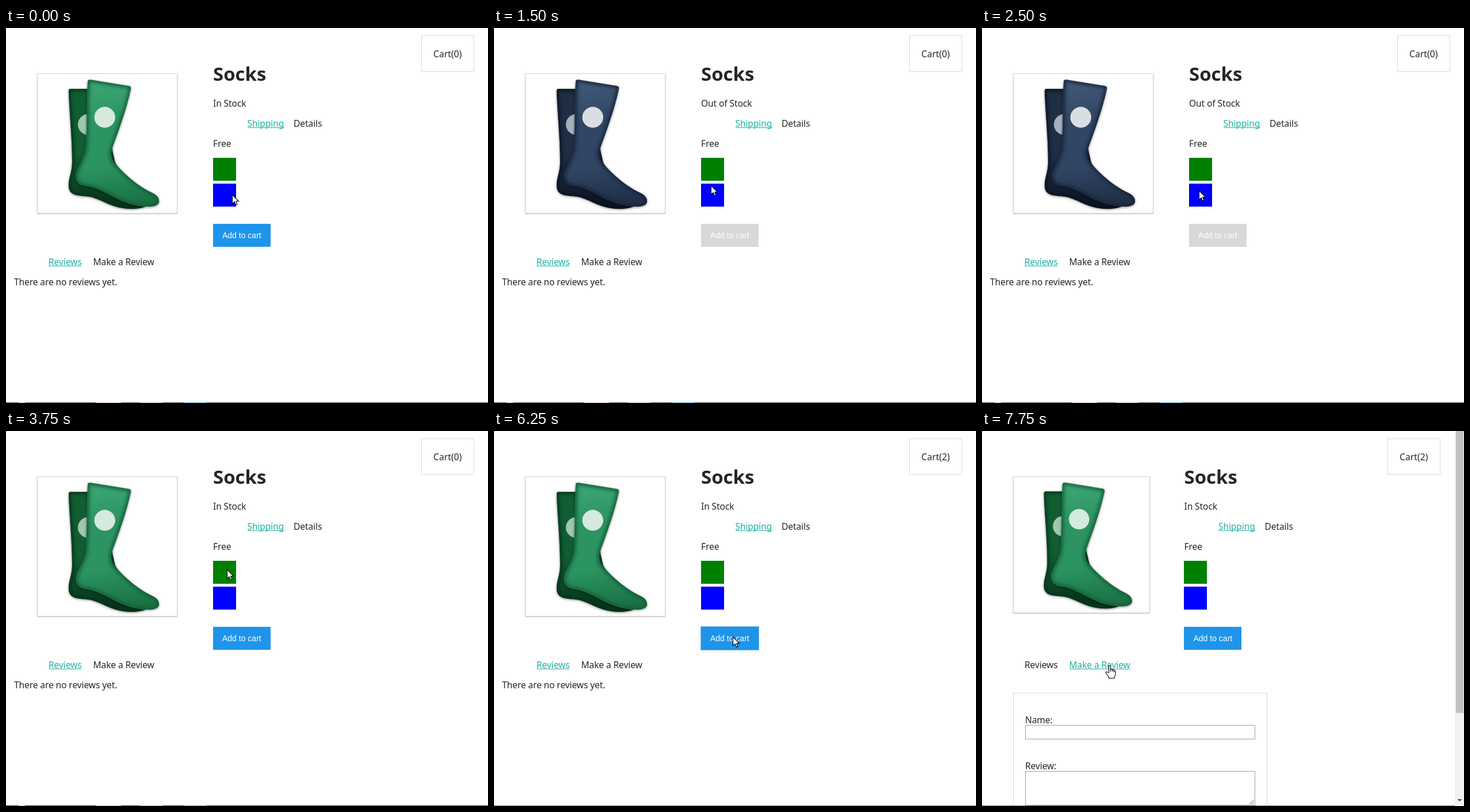
Animation, 838 px wide and 653 px high, one loop 8000 ms. Source, as an HTML page with a canvas:

```html
<!DOCTYPE html>
<html lang="en">
<head>
<meta charset="utf-8">
<title>Socks</title>
<style>
  html, body { margin: 0; width: 100%; height: 100%; overflow: hidden; background: #fff; }
  canvas { display: block; width: 838px; height: 653px; }
</style>
</head>
<body>
<canvas id="stage" width="838" height="653"></canvas>
<script>
const ctx = document.getElementById('stage').getContext('2d');
const LOOP = 8000;
const INK = '#262626', TEAL = '#1fb1a3', RULE = '#d8d8d8';
const BODY = '15.6px "Noto Sans", "Open Sans", sans-serif';
const TITLE = 'bold 33px "Noto Sans", "Open Sans", sans-serif';
const BUTTON = '14px "Liberation Sans", Arial, sans-serif';

// Pointer stops: time, x, y
const STOPS = [
  [0, 393, 290], [250, 350, 243], [500, 371, 246], [750, 382, 268],
  [1000, 380, 298], [1500, 377, 274], [1750, 381, 248], [2000, 376, 246],
  [2500, 377, 283], [2750, 379, 279], [3500, 376, 273], [3750, 384, 241],
  [4000, 402, 246], [4250, 434, 341], [4500, 406, 387], [4750, 415, 358],
  [6750, 210, 488], [7000, 146, 432], [7250, 114, 418], [7500, 222, 408]
];

const PALETTES = {
  green: { light: '#3ca674', mid: '#2b9461', dark: '#1a7244', rim: '#135c37', back: '#115e32', deep: '#06331a', badge: '#d5e9dd', badgeBack: '#a3c6b1' },
  navy: { light: '#425979', mid: '#314664', dark: '#1f2f47', rim: '#18253a', back: '#1f2e45', deep: '#0b1422', badge: '#d9dee3', badgeBack: '#a6b0bd' }
};

const SOCK = new Path2D('M146 90 L214 101 Q218 102 217 106 C210 140 196 178 185 208 ' +
  'C181 221 183 229 191 238 C208 256 230 276 254 287 Q267 293 266 303 ' +
  'Q264 311 247 311 C222 311 203 303 184 293 C168 284 151 276 136 275 ' +
  'Q121 272 121 257 C122 244 134 232 138 212 C141 190 140 130 142 94 Q142 90 146 90 Z');
const BACK_SOCK = new Path2D('M112 106 L160 106 L190 235 L242 311 Q226 317 205 314 ' +
  'C181 311 165 298 147 294 C130 291 108 295 109 273 C109 261 115 250 115 233 ' +
  'C115 190 110 146 109 110 Q109 106 112 106 Z');
const ARROW = new Path2D('M.5 .5 V16 L4.1 12.7 L6.6 18.3 L9 17.3 L6.6 11.8 H11.6 Z');
const HAND = new Path2D('M-1.5 13 V1.8 Q-1.5 0 0 0 Q1.6 0 1.6 1.8 V7 Q4.5 6 4.8 8 ' +
  'Q7.2 7 7.6 9 Q10 8.6 10 11 V15.5 Q10 18 8 20 V22.5 H-1.5 V20.5 ' +
  'L-6.2 14 Q-7.5 12 -6 11.3 Q-4.7 10.8 -3 13 Z');

function text(s, x, y, { font = BODY, color = INK, spacing = -0.12, underline = false } = {}) {
  ctx.font = font;
  ctx.letterSpacing = spacing + 'px';
  ctx.fillStyle = color;
  ctx.fillText(s, x, y);
  if (underline) ctx.fillRect(Math.round(x), y + 1, Math.round(ctx.measureText(s).width), 1);
}

function tab(s, x, y, active) {
  text(s, x, y, { color: active ? TEAL : INK, underline: active });
}

function box(x, y, w, h, color) {
  ctx.fillStyle = color;
  ctx.fillRect(x, y, w, h);
}

function frame(x, y, w, h, color) {
  ctx.strokeStyle = color;
  ctx.lineWidth = 1;
  ctx.strokeRect(x + 0.5, y + 0.5, w - 1, h - 1);
}

function disc(x, y, r, color) {
  ctx.fillStyle = color;
  ctx.beginPath();
  ctx.arc(x, y, r, 0, 2 * Math.PI);
  ctx.fill();
}

function gradient(x0, y0, x1, y1, ...colors) {
  const g = ctx.createLinearGradient(x0, y0, x1, y1);
  colors.forEach((c, i) => g.addColorStop(i / (colors.length - 1), c));
  return g;
}

// Filled shape with a soft drop shadow and darkened edges
function fabric(path, fill, rim) {
  ctx.save();
  ctx.shadowColor = 'rgba(0,0,0,.5)';
  ctx.shadowBlur = 4;
  ctx.shadowOffsetY = 1;
  ctx.fillStyle = fill;
  ctx.fill(path);
  ctx.restore();

  ctx.save();
  ctx.clip(path);
  ctx.filter = 'blur(3px)';
  ctx.strokeStyle = rim;
  ctx.lineWidth = 7;
  ctx.stroke(path);
  ctx.restore();
}

function picture(size, p) {
  ctx.save();
  ctx.shadowColor = '#c8c8c8';
  ctx.shadowBlur = 2;
  ctx.shadowOffsetY = 1;
  box(54, 79, size, size, '#fff');
  ctx.restore();
  frame(54, 79, size, size, '#d2d2d2');

  ctx.save();
  ctx.translate(54, 79);
  ctx.scale(size / 244, size / 244);
  ctx.translate(-54, -79);

  fabric(BACK_SOCK, gradient(125, 106, 170, 312, p.back, p.back, p.deep), p.deep);
  ctx.save();
  ctx.clip(BACK_SOCK);
  disc(143, 168, 18, p.badgeBack);
  ctx.restore();

  fabric(SOCK, gradient(165, 90, 200, 310, p.light, p.mid, p.mid, p.dark), p.rim);
  disc(171.7, 155.5, 18.2, p.badge);
  ctx.restore();
}

function taskbarEdge(t, formOpen) {
  if (t >= 5500) return box(0, 652, formOpen ? 822 : 838, 1, '#747874');
  box(0, 652, 838, 1, '#343434');
  box(22, 652, 11, 1, '#c4c4c4');
  box(157, 652, 43, 1, '#d2b8b0');
  box(233, 652, 39, 1, '#a4b0b8');
  box(310, 652, 38, 1, '#35b0da');
}

function reviewForm() {
  frame(54, 456, 442, 230, RULE);
  text('Name:', 75, 509);
  frame(75, 512, 400, 25, '#a0a0a0');
  text('Review:', 75, 589);
  frame(75, 592, 400, 60, '#a0a0a0');
  ctx.strokeStyle = '#666';
  ctx.beginPath();
  for (const d of [8, 4]) {
    ctx.moveTo(473 - d, 650);
    ctx.lineTo(473, 650 - d);
  }
  ctx.stroke();
}

function scrollbar() {
  box(822, 0, 16, 652, '#f1f1f1');
  box(824, 0, 13, 491, '#c1c1c1');
  ctx.fillStyle = '#505050';
  ctx.fill(new Path2D('M826.5 641 H834.5 L830.5 645 Z'));
}

function pointer(t) {
  const [, x, y] = STOPS.findLast(s => s[0] <= t);
  ctx.save();
  ctx.translate(x, y);
  const shape = t >= 7500 ? HAND : ARROW;
  ctx.fillStyle = '#fff';
  ctx.fill(shape);
  ctx.strokeStyle = '#000';
  ctx.lineWidth = 1.1;
  ctx.stroke(shape);
  if (shape === HAND) ctx.stroke(new Path2D('M1.6 7 V11 M4.8 8 V11 M7.6 9 V12'));
  ctx.restore();
}

function draw(t) {
  const navy = (t >= 1000 && t < 1750) || (t >= 2500 && t < 3750);
  const formOpen = t >= 7750;
  const focused = t >= 5500 && !formOpen;
  const count = t < 5500 ? 0 : t < 6250 ? 1 : 2;
  const textX = formOpen ? 351.5 : 360;
  const boxX = Math.floor(textX);
  const cartX = formOpen ? 705 : 722;

  box(0, 0, 838, 653, '#fff');
  frame(cartX, 13, 92, 63, RULE);
  text(`Cart(${count})`, cartX + 21, 51, { spacing: 0.1 });

  picture(formOpen ? 238 : 244, navy ? PALETTES.navy : PALETTES.green);

  text('Socks', textX, 92, { font: TITLE, spacing: 0 });
  text(navy ? 'Out of Stock' : 'In Stock', textX, 137);
  tab('Shipping', textX + 59.5, 172, true);
  tab('Details', textX + 140, 172, false);
  text('Free', textX, 207);
  box(boxX, 226, 40, 40, '#008000');
  box(boxX, 271, 40, 40, '#0000ff');

  box(boxX, 341, 100, 40, navy ? RULE : '#1e95ea');
  if (focused) frame(boxX - 1, 340, 102, 42, '#80b8ea');
  text('Add to cart', textX + 16, 366, { font: BUTTON, color: '#fff', spacing: 0 });

  tab('Reviews', 74, 413, !formOpen);
  tab('Make a Review', 151.5, 413, formOpen);
  if (formOpen) {
    reviewForm();
    scrollbar();
  } else {
    text('There are no reviews yet.', 14, 448);
  }
  taskbarEdge(t, formOpen);
  pointer(t);
}

function tick() {
  draw(performance.now() % LOOP);
  requestAnimationFrame(tick);
}
tick();
</script>
</body>
</html>
```
